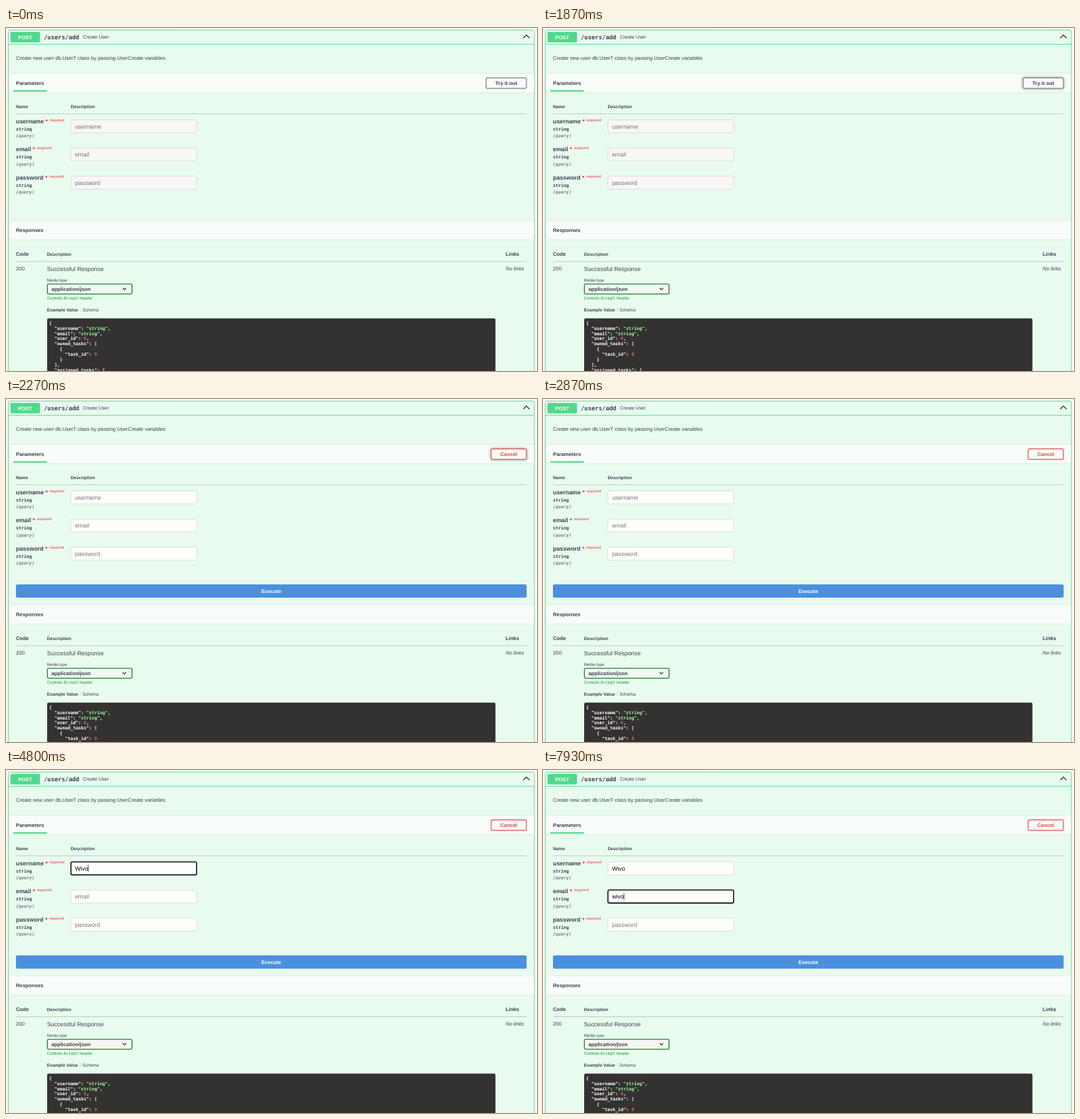
Write an HTML page that moves like this. It is 800 px wide and 518 px high and loops after 8000 ms.

```html
<!DOCTYPE html>
<html lang="en">
<head>
<meta charset="utf-8">
<title>Create User</title>
<style>
html, body { margin: 0; width: 100%; height: 100%; overflow: hidden; background: #fff; }
svg { display: block; width: 800px; height: 518px; }
text {
  font: 7.78px "Liberation Sans", Arial, sans-serif;
  fill: #3b4151;
  white-space: pre;
  text-rendering: geometricPrecision;
}
.b { font-weight: 700; }
.i { font-style: italic; }
.m { font-family: "DejaVu Sans Mono", monospace; font-weight: 700; }
.s { font-size: 6.67px; }
.xs { font-size: 6.2px; }
.l { font-size: 8.89px; }
.mid { text-anchor: middle; }
.w { fill: #fff; }
.str { fill: #a2fca2; }
.num { fill: #d36363; }
.ok { fill: #1a9130; }
.head { fill: #f8fdf9; filter: drop-shadow(0 .56px .8px rgba(0,0,0,.12)); }
</style>
</head>
<body>
<svg id="stage" viewBox="0 0 800 518"></svg>
<script>
const LOOP = 8000, SWITCH = 1930, ROW = 42.5;
const INK = '#3b4151', GREEN = '#50d98d';
const stage = document.getElementById('stage');

function el(tag, attrs, parent = stage) {
  const e = document.createElementNS('http://www.w3.org/2000/svg', tag);
  for (const k in attrs) e.setAttribute(k, attrs[k]);
  parent.append(e);
  return e;
}
function text(x, y, cls, str, parent, attrs) {
  const e = el('text', { x, y, class: cls, ...attrs }, parent);
  e.textContent = str;
  return e;
}
const rect = (x, y, width, height, attrs, parent) =>
  el('rect', { x, y, width, height, ...attrs }, parent);
const line = (d, stroke, width, parent) =>
  el('path', { d, stroke, 'stroke-width': width, fill: 'none' }, parent);

// Panel and its summary bar
rect(3.5, 3.2, 792.5, 530, { rx: 2.2, fill: '#e9faee', stroke: GREEN, 'stroke-width': .8,
  style: 'filter:drop-shadow(0 0 1.2px rgba(0,0,0,.19))' });
line('M3.5 24.6H796', GREEN, .9);
rect(6.7, 6, 44.6, 15.8, { rx: 1.7, fill: GREEN });
text(28.9, 16.8, 'b w mid', 'POST');
text(57, 17, 'm l', '/users/add');
text(116, 16.4, '', 'Create User', stage, { style: 'font-size:7.22px' });
line('M779.2 15.4L784 10.6L788.8 15.4', '#222', 1.3);
text(15, 48.4, '', 'Create new user db.UserT class by passing UserCreate variables');

// Parameters
rect(4, 69, 791.6, 28, { class: 'head' });
text(15, 86.2, 'b', 'Parameters');
rect(11, 94, 50.6, 2.2, { fill: GREEN });
const button = rect(0, 75.3, 0, 15.8, { rx: 2.2, fill: '#f8fdf9', 'stroke-width': 1.2 });
const label = text(0, 86.2, 'b mid', '');
text(15, 121.3, 'b s', 'Name');
text(97.5, 121.3, 'b s', 'Description');
line('M15 129.6H784.4', '#b5c5bc', .9);

const fields = ['username', 'email', 'password'].map((name, n) => {
  const y = n * ROW;
  const title = text(15, 143.8 + y, 'b l', name);
  const end = 15 + title.getComputedTextLength();
  text(end + 2.47, 143.8 + y, 'b l', '*', stage, { style: 'fill:#f02c32' });
  text(end + 8.7, 140.5 + y, 'b', 'required', stage, { style: 'font-size:5.56px;fill:#ee646a' });
  text(15, 154.9 + y, 'm s', 'string');
  text(15, 165.1 + y, 'm s i', '(query)', stage, { style: 'fill:#777f7c' });
  return {
    name,
    box: rect(97.8, 138.8 + y, 189.4, 19.6, { rx: 2.2 }),
    value: text(103.9, 151.5 + y, 'l', name),
    caret: rect(0, 143.6 + y, .8, 10, { fill: '#000' })
  };
});

const execute = el('g', {});
rect(15, 280, 769.4, 20, { rx: 2.2, fill: '#4b90dc' }, execute);
text(399.6, 292.8, 'b w mid', 'Execute', execute);

// Responses
const lower = el('g', {});
rect(4, 291.4, 791.6, 28, { class: 'head' }, lower);
text(15, 308, 'b', 'Responses', lower);
text(15, 344.2, 'b', 'Code', lower);
text(61.8, 343.8, 'b s', 'Description', lower);
text(752.8, 344.2, 'b', 'Links', lower);
line('M15 352.6H784.4', '#b5c5bc', .9, lower);
text(15, 366.1, '', '200', lower);
text(61.8, 366.8, 'l', 'Successful Response', lower);
text(752.8, 366.1, 'i', 'No links', lower);
text(61.8, 383.3, 'xs', 'Media type', lower);
rect(62.4, 386.6, 127.4, 15, { rx: 2, fill: '#f4f7f3', stroke: '#23892f', 'stroke-width': 1.3,
  style: 'filter:drop-shadow(0 .5px .6px rgba(0,0,0,.25))' }, lower);
text(68.4, 396.9, 'b', 'application/json', lower);
line('M175.8 392.6L178.4 395.3L181 392.6', '#111', 1.1, lower);
text(61.8, 410.2, 'xs ok', 'Controls', lower);
text(86.7, 410.2, 'm xs ok', 'Accept', lower, { style: 'font-weight:400' });
text(110.9, 410.2, 'xs ok', 'header.', lower);
text(61.8, 427.6, 'b s', 'Example Value', lower);
line('M112 421.5V428.6', '#bccac2', .7, lower);
text(115.2, 427.6, 's', 'Schema', lower);
rect(62, 438.6, 675.4, 110, { rx: 2.2, fill: '#333230' }, lower);

['{', '  "username": "string",', '  "email": "string",', '  "user_id": 0,',
 '  "owned_tasks": [', '    {', '      "task_id": 0', '    }', '  ],', '  "assigned_tasks": ['
].forEach((code, n) => {
  const row = text(65, 447.9 + n * 7.86, 'm s w', '', lower);
  code.split(/("string"|0)/).forEach(part => {
    const cls = part === '"string"' ? 'str' : part === '0' ? 'num' : 'w';
    el('tspan', { class: cls }, row).textContent = part;
  });
});

// Typing: the times at which each letter appears
const entries = [
  { word: 'Wivo', keys: [4070, 4330, 4530, 4800], focus: [3400, 6470], off: [[4000, 4070], [5400, 6000]] },
  { word: 'wivo', keys: [7330, 7470, 7730, 7930], focus: [6470, LOOP], off: [[7070, 7330]] }
];
const within = (t, [a, b]) => t >= a && t < b;
const ease = (t, from, to) => {
  const p = Math.min(1, Math.max(0, (t - from) / (to - from)));
  return p * p * (3 - 2 * p);
};
const mix = (a, b, p) => `rgb(${a.map((v, n) => v + (b[n] - v) * p)})`;

function draw(t) {
  const open = t >= SWITCH;
  execute.style.display = open ? '' : 'none';
  lower.setAttribute('transform', `translate(0 ${open ? 20 : 0})`);

  const hover = ease(t, 1490, 1790) - ease(t, 2260, 2560);
  const red = ease(t, SWITCH, SWITCH + 300);
  const left = open ? 731 : 723.4;
  button.setAttribute('x', left);
  button.setAttribute('width', 784 - left);
  button.setAttribute('stroke', mix([125, 130, 127], [228, 80, 74], red));
  button.style.filter =
    `drop-shadow(0 ${.56 * (1 - hover)}px ${1.1 + 1.3 * hover}px rgba(0,0,0,${.1 + .3 * hover}))`;
  label.setAttribute('x', (left + 784) / 2);
  label.textContent = open ? 'Cancel' : 'Try it out';
  label.style.fill = mix([59, 65, 81], [222, 72, 66], red);

  fields.forEach(({ name, box, value, caret }, n) => {
    const entry = entries[n];
    const typed = entry ? entry.word.slice(0, entry.keys.filter(k => t >= k).length) : '';
    const focused = entry && within(t, entry.focus);
    value.textContent = typed || name;
    value.style.fill = typed ? '#000' : '#757575';
    box.setAttribute('fill', open ? '#fefefd' : '#f8f7f5');
    box.setAttribute('stroke', focused ? '#101010' : '#d5d9d5');
    box.setAttribute('stroke-width', focused ? 1.6 : .8);
    caret.setAttribute('x', 103.8 + (typed ? value.getComputedTextLength() : 0));
    caret.style.display = focused && !entry.off.some(o => within(t, o)) ? '' : 'none';
  });
}

const start = performance.now();
function tick() {
  draw((performance.now() - start) % LOOP);
  requestAnimationFrame(tick);
}
tick();
</script>
</body>
</html>
```
